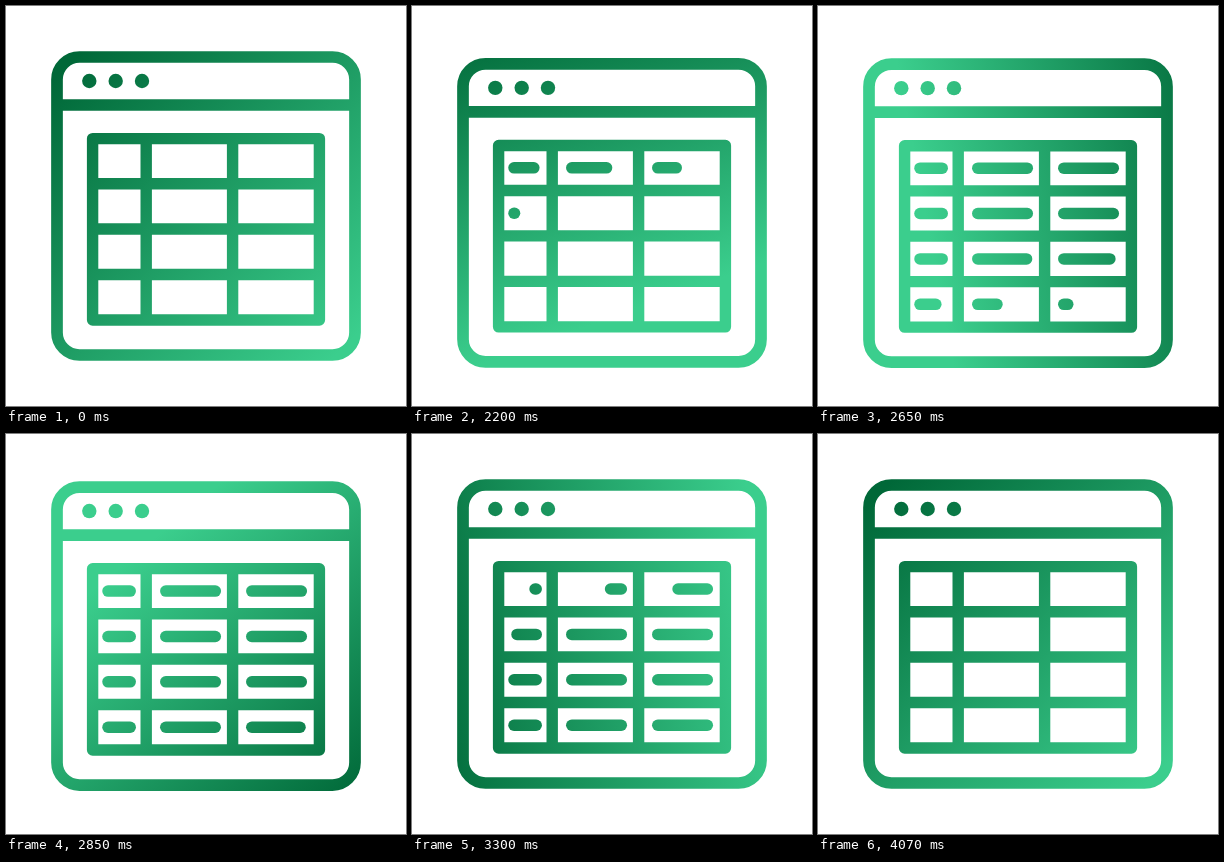
An HTML page that plays this animation: 400 px wide and 400 px high, repeating every 4100 ms.

```html
<!DOCTYPE html>
<html lang="en">
<head>
<meta charset="utf-8">
<title>Spreadsheet window</title>
<style>
  html, body { margin: 0; width: 100%; height: 100%; overflow: hidden; background: #fff; }
  svg { display: block; width: 100%; height: 100%; }
</style>
</head>
<body>
<svg viewBox="0 0 400 400">
  <defs>
    <linearGradient id="green" gradientUnits="userSpaceOnUse">
      <stop offset="0" stop-color="#006838"/>
      <stop offset="1" stop-color="#3bce8d"/>
    </linearGradient>
  </defs>
  <g id="icon" fill="none" stroke="url(#green)" stroke-width="11.7">
    <rect x="51" y="51" width="298" height="298" rx="22.5"/>
    <path d="M51 99H349"/>
    <g fill="url(#green)" stroke="none">
      <circle cx="83.3" cy="75" r="7.2"/>
      <circle cx="109.7" cy="75" r="7.2"/>
      <circle cx="136" cy="75" r="7.2"/>
    </g>
    <g stroke-width="11.4" stroke-linejoin="round">
      <rect x="86.6" y="132.6" width="226.8" height="181.4"/>
      <path d="M140.2 132V314M226.6 132V314M86 177.7H314M86 223H314M86 268.5H314"/>
    </g>
    <g id="dashes" stroke-linecap="round" stroke-width="11.5"></g>
  </g>
</svg>
<script>
const LOOP = 4100, START = 2020, TURN = 1630, TRIM = 320;
const icon = document.getElementById('icon');
const gradient = document.getElementById('green');
const group = document.getElementById('dashes');

const progress = (t, from, length) => Math.min(1, Math.max(0, (t - from) / length));
// Quick start, long soft landing.
const ease = u => 4 * u * u / (4 * u * u + (1 - u) ** 2);
const easeSine = u => (1 - Math.cos(Math.PI * u)) / 2;

const dashes = [];
for (let row = 0; row < 4; row++) {
  [[102, 124.2], [159.8, 209.3], [245.8, 295.3]].forEach(([x1, x2], col) => {
    const el = document.createElementNS('http://www.w3.org/2000/svg', 'path');
    group.append(el);
    dashes.push({
      el, x1, x2,
      y: 155 + row * 45.4,
      draw: START - 8 + row * 166 + col * 50,
      erase: 3083 + row * 165 + col * 62
    });
  });
}

// The dark end circles the icon once while the light end swings in and out.
function turnGradient(t) {
  const u = progress(t, START, TURN);
  const angle = Math.PI * (1.25 + 2 * u) - 0.4 * Math.sin(2 * Math.PI * u);
  const bell = Math.sin(Math.PI * Math.sqrt(u));
  const place = (end, radius) => {
    gradient.setAttribute('x' + end, 200 + radius * Math.cos(angle));
    gradient.setAttribute('y' + end, 200 + radius * Math.sin(angle));
  };
  place(1, 198 + 30 * bell);
  place(2, 115 * bell - 198);
}

function drawDash(d, t) {
  const visible = t >= Math.max(START, d.draw) && t < d.erase + TRIM;
  d.el.style.display = visible ? '' : 'none';
  if (!visible) return;
  const edge = since => d.x1 + (d.x2 - d.x1) * ease(progress(t, since, TRIM));
  const left = edge(d.erase);
  const right = Math.max(edge(d.draw), left + 0.01);
  d.el.setAttribute('d', `M${left} ${d.y}H${right}`);
}

function render(t) {
  const drop = 13 * (easeSine(progress(t, START, 350)) - ease(progress(t, 2370, 900)));
  icon.setAttribute('transform', `translate(0 ${drop})`);
  turnGradient(t);
  dashes.forEach(d => drawDash(d, t));
}

const begin = performance.now();
function tick() {
  render((performance.now() - begin) % LOOP);
  requestAnimationFrame(tick);
}
tick();
</script>
</body>
</html>
```
